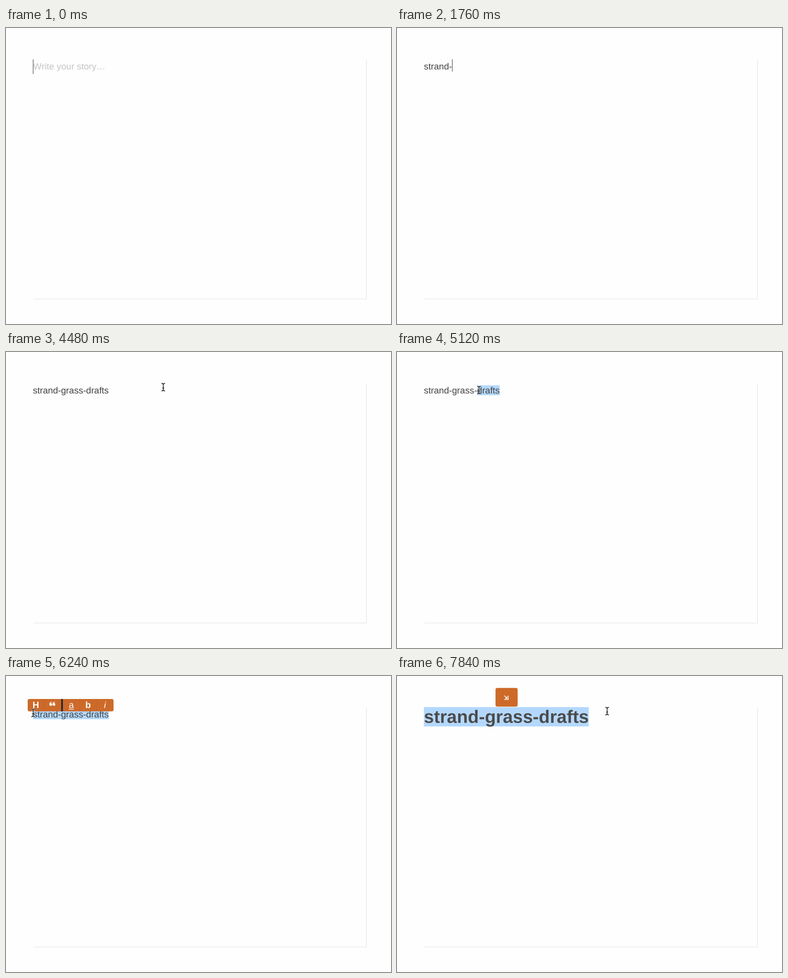
Write an HTML page with a canvas that moves like this. It is 852 px wide and 657 px high and loops after 8 s.

```html
<!DOCTYPE html>
<html lang="en">
<head>
<meta charset="utf-8">
<title>Text editor</title>
<style>
  html, body { margin: 0; width: 100%; height: 100%; overflow: hidden; background: #fefefe; }
  canvas { display: block; }
</style>
</head>
<body>
<canvas id="stage" width="852" height="657"></canvas>
<script>
const ctx = document.getElementById('stage').getContext('2d');
const LOOP = 8000, STEP = 80;
const TEXT = 'strand-grass-drafts';
const LEFT = 59.5;
const ORANGE = '#cd6a2a', INK = '#444', SELECTED = '#b4d8fd';
const BODY_FONT = '20px "Liberation Sans", Arial, sans-serif';
const HEADING_FONT = 'bold 39.8px "Liberation Sans", Arial, sans-serif';

// When each character of TEXT is typed.
const TYPED = [720, 880, 960, 1120, 1280, 1360, 1760, 2000, 2080, 2160,
  2320, 2560, 3200, 3280, 3440, 3520, 3600, 3760, 4000];
const CARET = [[0, 1], [80, 0], [640, 1], [3120, 0], [3200, 1], [4480, 0]];
// Index of the first selected character.
const SELECTION = [[0, TEXT.length], [5040, 18], [5120, 13], [5200, 8], [5280, 7], [5600, 0]];
const TOOLBAR_AT = 5280, HEADING_AT = 7120;
const POINTER = [[4400, 843, 334], [4480, 348, 78], [4640, 300, 53], [4880, 231, 84],
  [5040, 228, 85], [5200, 135, 84], [5280, 118, 85], [5520, 75, 85], [5760, 21, 94],
  [5920, 22, 92], [6080, 56, 86], [6320, 62, 80], [6560, 66, 66], [7120, 66, 66],
  [7360, 180, 122], [7600, 360, 112], [7840, 465, 78]];

const BEAM = new Path2D('M-4-8.5Q0-8.5 0-5V5Q0 8.5-4 8.5M4-8.5Q0-8.5 0-5M0 5Q0 8.5 4 8.5M-2 2H2');
const HAND = new Path2D('M-2 9V1a1.6 1.6 0 0 1 3.2 0V6q2.2-1 2.8 .8 2-.7 2.5 1 2-.3 2 1.5' +
  'V12q0 2-1.5 3.5V17.5H-2.5V16q-2-2.5-4-5.5-.8-2.2 1.2-2.2 1.3 .2 3.3 2.7Z');
const QUOTE = new Path2D('M5.5-5Q0-4.5 0 1a3 3 0 1 0 3-2.9Q3-4 5.5-4ZM12.5-5Q7-4.5 7 1a3 3 0 1 0 3-2.9Q10-4 12.5-4Z');

const stepAt = (keys, t) => keys.filter(k => k[0] <= t).pop()[1];

function pointerAt(t) {
  if (t < POINTER[0][0]) return null;
  const next = POINTER.findIndex(k => k[0] > t);
  if (next < 0) return POINTER[POINTER.length - 1].slice(1);
  const [t0, x0, y0] = POINTER[next - 1], [t1, x1, y1] = POINTER[next];
  const p = (t - t0) / (t1 - t0);
  return [x0 + (x1 - x0) * p, y0 + (y1 - y0) * p];
}

function rect(x, y, w, h, color) {
  ctx.fillStyle = color;
  ctx.fillRect(x, y, w, h);
}

function write(text, x, y, font, color, align = 'left') {
  ctx.font = font;
  ctx.fillStyle = color;
  ctx.textAlign = align;
  ctx.fillText(text, x, y);
}

function widthOf(text, font) {
  ctx.font = font;
  return ctx.measureText(text).width;
}

function panel(x, y, w, h) {
  ctx.beginPath();
  ctx.roundRect(x, y, w, h, 4);
  ctx.fillStyle = ORANGE;
  ctx.fill();
}

function drawToolbar(x, hover) {
  ctx.save();
  ctx.translate(x, 51);
  panel(0, 0, 190, 27.5);
  ctx.clip();
  if (hover) rect(0, 0, 37, 28, '#505050');
  for (const gap of [36.5, 115, 152]) rect(gap, 0, 1, 28, 'rgba(0,0,0,.07)');
  rect(74, 0, 4, 28, '#2d2d2d');
  const label = (text, cx, style) => write(text, cx, 20.3, style + ' ' + BODY_FONT, '#fff', 'center');
  label('H', 18, 'bold');
  label('a', 96.5, '');
  label('b', 133.5, 'bold');
  label('i', 171, 'italic');
  rect(91, 22, 11, 1.3, '#fff');
  ctx.translate(48, 11);
  ctx.fill(QUOTE);
  ctx.restore();
}

function drawResetButton() {
  panel(218, 26.5, 49, 41.5);
  ctx.strokeStyle = ctx.fillStyle = '#fff';
  ctx.lineWidth = 1.6;
  ctx.stroke(new Path2D('M237.5 52.3H246V43.5M237.5 43.5L243 49'));
  ctx.fill(new Path2D('M244 45V50.5H238.5Z'));
}

function drawPointer([x, y], overButton) {
  ctx.save();
  ctx.translate(x, y);
  ctx.lineJoin = 'round';
  if (overButton) {
    ctx.fillStyle = '#fff';
    ctx.strokeStyle = '#111';
    ctx.lineWidth = 1.3;
    ctx.fill(HAND);
    ctx.stroke(HAND);
    ctx.stroke(new Path2D('M1.2 11V14.5M3.6 11V14.5M-1.2 11V14.5'));
  } else {
    for (const [color, width] of [['#fff', 3], ['#111', 1.5]]) {
      ctx.strokeStyle = color;
      ctx.lineWidth = width;
      ctx.stroke(BEAM);
    }
  }
  ctx.restore();
}

function drawBody(t) {
  const typed = TEXT.slice(0, TYPED.filter(at => at <= t).length);
  const from = stepAt(SELECTION, t);
  const selectLeft = LEFT + widthOf(TEXT.slice(0, from), BODY_FONT);
  const right = LEFT + widthOf(typed, BODY_FONT);
  if (from < TEXT.length) rect(selectLeft, 74, right - selectLeft, 22, SELECTED);
  if (stepAt(CARET, t)) rect(typed ? right : 59.5, 69.5, 1.3, typed ? 27 : 32.5, '#555');
  if (typed) write(typed, LEFT, 91.7, BODY_FONT, INK);
  else write('Write your story…', 60, 91.7, BODY_FONT, '#c4c4c4');
  return Math.round((selectLeft + right) / 2 - 95);
}

function drawHeading() {
  rect(LEFT, 69, widthOf(TEXT, HEADING_FONT), 43, SELECTED);
  write(TEXT, LEFT, 104, HEADING_FONT, '#4b4b4b');
  drawResetButton();
}

function draw(t) {
  rect(0, 0, 852, 657, '#fefefe');
  rect(797, 70, 1.3, 532, '#e4e4e4');
  rect(60.5, 601, 737, 1, '#e2e2e2');
  ctx.fontKerning = 'none';
  ctx.textRendering = 'geometricPrecision';

  const pointer = pointerAt(t);
  let overToolbar = false;
  if (t >= HEADING_AT) {
    drawHeading();
  } else {
    const barLeft = drawBody(t);
    if (t >= TOOLBAR_AT) {
      const [x, y] = pointer;
      overToolbar = x > barLeft && x < barLeft + 190 && y < 78;
      drawToolbar(barLeft, overToolbar && x < barLeft + 37);
    }
  }
  if (pointer) drawPointer(pointer, overToolbar);
}

const start = performance.now();
function tick() {
  const t = (performance.now() - start) % LOOP;
  draw(Math.floor(t / STEP) * STEP);
  requestAnimationFrame(tick);
}
tick();
</script>
</body>
</html>
```
